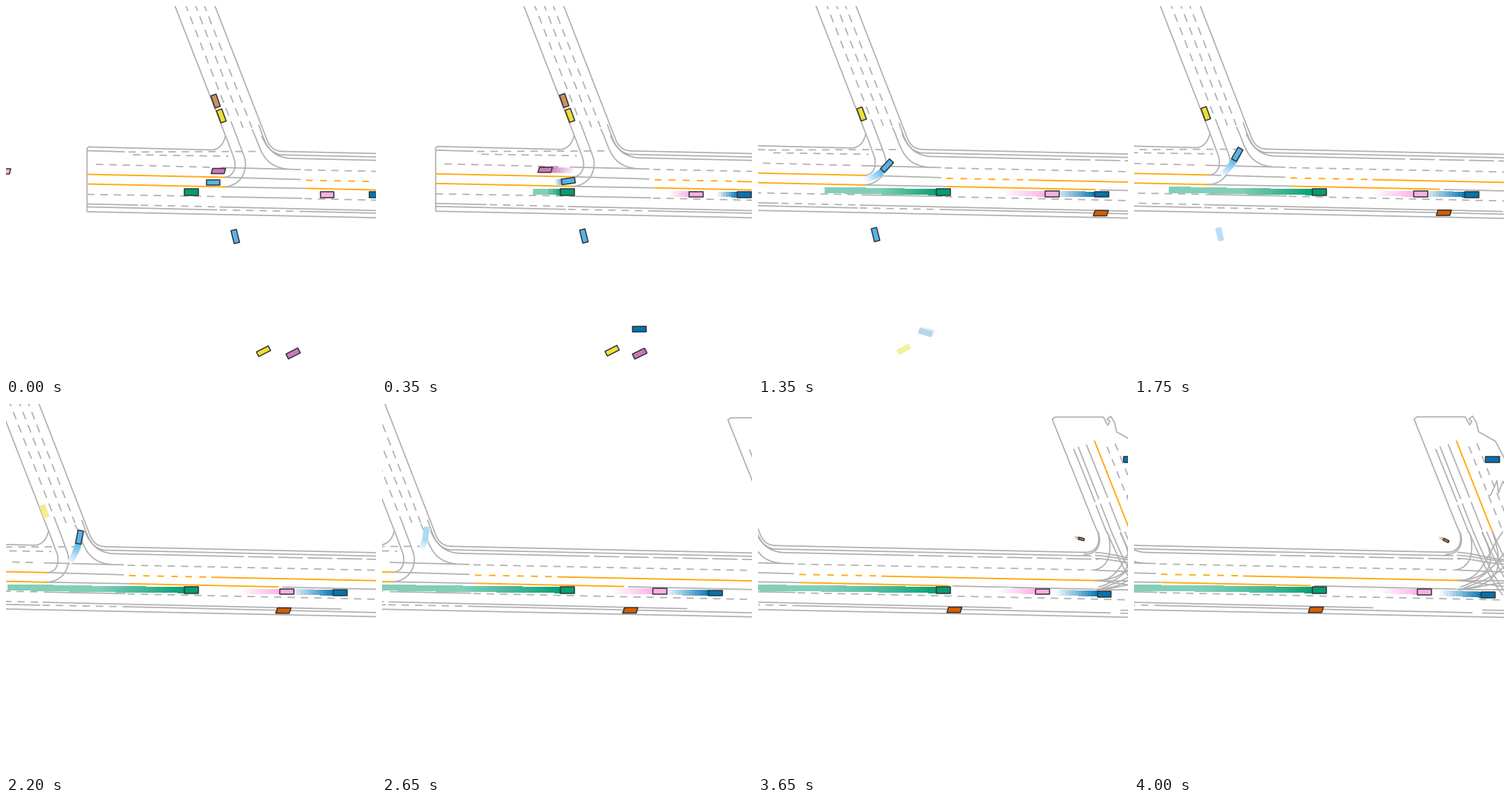
These frames come from a looping animation (500x500 px, 4050 ms). A matplotlib script:

```python
import numpy as np
import matplotlib.pyplot as plt
from matplotlib.animation import FuncAnimation
from matplotlib.collections import LineCollection, PolyCollection
from matplotlib.colors import to_rgb

SIZE, DPI, FRAMES, STEP = 500, 100, 81, 50
PX = 72 / DPI
FADE = 14

BLUE, GREEN, RED, PURPLE = "#0173b2", "#029e73", "#d55e00", "#cc78bc"
BROWN, PINK, YELLOW, SKY = "#ca9161", "#fbafe4", "#ece133", "#56b4e9"
GRAY, AMBER, EDGE = "#b0b0b0", "#ffaa14", "#333333"

# Camera keys: frame, x, y of the view's top-left corner
CAMERA = [(0, 0, 0), (7, 37, 0.7), (19, 106, 2), (35, 194, 3.1),
          (53, 280, 4.2), (65, 326, 4.9), (80, 369, 5.4)]


def spline(t, keys):
    """Smooth interpolation through rows of (frame, values...)."""
    k = np.array(keys, float)
    f, v = k[:, 0], k[:, 1:]
    if len(k) == 1:
        return v[0]
    m = np.gradient(v, f, axis=0)
    i = int(np.clip(np.searchsorted(f, t) - 1, 0, len(f) - 2))
    h = f[i + 1] - f[i]
    u = np.clip((t - f[i]) / h, 0, 1)
    return ((1 + 2 * u) * (1 - u) ** 2 * v[i] + u * (1 - u) ** 2 * h * m[i]
            + u * u * (3 - 2 * u) * v[i + 1] + u * u * (u - 1) * h * m[i + 1])


# ---------------------------------------------------------------- road map
gray, amber = [], []


def line(*pts, to=gray, at=(0, 0)):
    to.append(np.array(pts, float) + at)


def dash(p, q, to=gray, on=10, off=8, at=(0, 0)):
    p, q = np.array(p, float) + at, np.array(q, float) + at
    length = np.hypot(*(q - p))
    for s in np.arange(0, length, on + off):
        e = min(s + on, length)
        to.append(np.array([p + (q - p) * s / length, p + (q - p) * e / length]))


def curve(p, a, b, q, at=(0, 0)):
    u = np.linspace(0, 1, 16)[:, None]
    p, a, b, q = (np.array(c, float) for c in (p, a, b, q))
    gray.append((1 - u) ** 3 * p + 3 * u * (1 - u) ** 2 * a
                + 3 * u * u * (1 - u) * b + u ** 3 * q + at)


def build_west():
    line((278, 194), (111, 190), (109, 192), (109, 277.5))
    curve((278, 194), (289, 193), (294, 184), (296, 175))
    line((109, 195), (160, 196.5))
    dash((165, 196.8), (345, 196))
    dash((171, 200.5), (300, 202.5))
    dash((121, 213.5), (278, 217.5))
    line((109, 227), (296, 231), to=amber)
    line((109, 240), (296, 244), to=amber)
    dash((109, 254), (285, 257))


def build_middle():
    line((290, 217.8), (398, 220.5))
    dash((403, 221), (800, 229))
    line((296, 231), (398, 234))
    dash((405, 235), (512, 237), to=amber, on=9, off=10)
    line((516, 237.3), (807, 243.3), to=amber)
    line((296, 244), (405, 246))
    line((405, 246), (607, 250.3), to=amber)
    line((612, 250.6), (804, 255))
    line((290, 257.3), (400, 259.4))
    dash((403, 259.8), (880, 270))

    line((372, 196), (794, 205.3))
    line((368, 200.6), (800, 210))
    line((382, 205.4), (560, 209.4))
    dash((566, 209.5), (810, 214.5), on=34, off=6)

    line((109, 267), (178, 268.6))
    dash((182, 268.7), (285, 271))
    line((288, 271.1), (692, 280.3))
    line((109, 271), (285, 275))
    dash((288, 275), (396, 277))
    line((396, 277), (826, 287))
    line((109, 277.5), (890, 293.7))


def build_ramp():
    slope = 0.389
    line((226.5, -4), (299, 182), (306, 201))
    curve((306, 201), (313, 217), (307, 231), (294, 231))
    for x in (243, 256, 268):
        dash((x - 4 * slope, -4), (x + 164 * slope, 164), on=11, off=8)
    line((243 + 164 * slope, 164), (321, 202))
    curve((321, 202), (328, 220), (318, 244), (292, 244))
    line((280.5, -4), (352, 180))
    curve((352, 180), (356, 190), (362, 196), (374, 196))
    curve((341, 160), (350, 185), (354, 202), (382, 205.4))
    curve((345, 175), (352, 191), (358, 197), (370, 200.6))
    curve((332, 166), (344, 190), (344, 216), (380, 220))


def build_east():
    at = (369, 5.3)
    line((440, 174), (434, 160), (378, 20), (382, 17), (447, 17), (453, 28),
         (456, 23), (452, 20), (457, 16), (462, 24), (465, 37), (488, 50),
         (500, 73), (512, 100), at=at)
    curve((440, 174), (443, 188), (438, 200), (422, 200), at=at)
    line((407, 60), (436, 132), at=at)
    line((413, 57), (441, 128), at=at)
    line((424, 54), (453, 126), at=at)
    for x, y in ((437, 136), (443, 134), (455, 132)):
        line((x, y), (x + 15, y + 38), at=at)
    line((435, 49), (484, 173), to=amber, at=at)
    dash((452, 57), (498, 172), at=at)
    dash((463, 53), (508, 165), at=at)
    line((478, 124), (482, 122), (490, 103), (492, 120), (498, 104), (504, 116), at=at)

    # Turning lanes inside the crossing
    curve((440, 172), (446, 190), (438, 203), (420, 203), at=at)
    curve((454, 176), (459, 200), (455, 222), (432, 224), at=at)
    curve((470, 174), (486, 205), (492, 235), (438, 238), at=at)
    curve((484, 173), (498, 215), (500, 245), (438, 250), at=at)
    for x in (452, 458, 470, 476, 484):
        curve((x, 172), (x + 14, 205), (x + 28, 235), (x + 46, 258), at=at)
    for x, y in ((498, 172), (508, 190), (512, 205)):
        curve((x, y), (x - 22, y + 30), (470, 238), (440, 238 + (x - 498) * 0.9), at=at)
    for y0, y1 in ((200, 210), (204, 212), (208, 216), (224, 226), (238, 238),
                   (238, 246), (250, 250), (250, 240)):
        curve((436, y0), (460, y0 + 1), (480, y1), (515, y1 + 1), at=at)
    line((470, 278), (515, 279), at=at)
    line((470, 282), (515, 283), at=at)


build_west()
build_middle()
build_ramp()
build_east()


# ---------------------------------------------------------------- agents
class Agent:
    """Box with a fading trail; keys are (frame, x, y, degrees)."""

    def __init__(self, color, keys, born=0, died=FRAMES, size=(18.5, 7.5),
                 skew=0, ego=False):
        self.rgb = np.array(to_rgb(color))
        self.keys, self.born, self.died = keys, born, died
        self.ego = ego
        w, h = size[0] / 2, size[1] / 2
        self.box = np.array([(-w - skew, h), (-w + skew, -h),
                             (w + skew, -h), (w - skew, h)])
        self.shapes = {n: self.shape(n) for n in range(born, min(died + 1, FRAMES))}

    def shape(self, n):
        x, y, deg = spline(n, self.keys)
        c, s = np.cos(np.radians(deg)), np.sin(np.radians(deg))
        return self.box @ np.array([(c, s), (-s, c)]) + (x, y)

    def trail(self, n):
        span = n - self.born + 1
        for k, shape in self.shapes.items():
            if k >= n:
                break
            if self.ego:
                a = max(0.5, 1 - (n - k) / span)
            else:
                a = 1 - (n - k) / min(FADE, span)
            if a > 0.05:
                yield shape, 1 - a * (1 - self.rgb)


agents = [
    Agent(PINK, [(0, -3, 223, 0)], died=4, size=(16, 7), skew=1),
    Agent(PURPLE, [(0, 286.5, 222.5, 0), (7, 257, 221.5, 0), (9, 249, 221.2, 0)],
          died=9, size=(17.5, 7), skew=1),
    Agent(BROWN, [(0, 282.7, 128, 71)], died=11, size=(17.5, 7.5)),
    Agent(YELLOW, [(0, 290.5, 148, 70)], died=38, size=(17.5, 7.5)),
    Agent(SKY, [(0, 309.3, 311, 76)], died=27, size=(18, 7.5)),
    Agent(YELLOW, [(0, 347.5, 466, -27)], died=20, size=(18, 7)),
    Agent(PURPLE, [(0, 387.5, 469, -27), (7, 384.5, 470, -26), (10, 383, 469.5, -25)],
          died=10, size=(18, 7.5)),
    Agent(BLUE, [(4, 384.5, 437, 0), (8, 384, 437, 0), (17, 376.5, 443.5, 17)],
          born=4, died=17, size=(18.5, 7.5)),
    Agent(SKY, [(0, 279, 237.8, 0), (7, 288.3, 236.7, -8), (19, 313, 229, -34),
                (35, 333, 203, -60), (46, 339, 178.5, -83)], died=46, size=(18, 7.5)),
    Agent(PINK, [(0, 433.7, 254.3, 0), (7, 461, 254.5, 0), (19, 514, 255.5, 0),
                 (35, 581, 256.6, 0), (53, 655, 256.7, 0), (65, 703, 257.2, 0),
                 (80, 761, 259, 0)]),
    Agent(BLUE, [(0, 499.5, 254.5, 0), (7, 526, 255.2, 0), (19, 580, 256.2, 0),
                 (35, 650, 257.5, 0), (53, 730, 259.3, 0), (65, 783, 260.2, 0),
                 (80, 847, 263, 0)]),
    Agent(RED, [(24, 614.5, 282, 0), (35, 612.2, 282, 0), (46, 614, 282.4, 0),
                (53, 615.2, 282.6, 0), (80, 614.3, 283, 0)],
          born=24, size=(18, 7.3), skew=1.2),
    Agent(BROWN, [(60, 779.5, 184.8, 4), (65, 782, 185.2, 4), (80, 790.3, 189.4, 25)],
          born=60, size=(7.5, 2.8)),
    Agent(BLUE, [(68, 853, 79.7, 0)], born=68),
    Agent(GREEN, [(n, x + 250.3, y + 251, 0) for n, x, y in CAMERA],
          size=(19, 8.3), ego=True),
]

# ---------------------------------------------------------------- drawing
fig = plt.figure(figsize=(SIZE / DPI, SIZE / DPI), dpi=DPI, facecolor="white")
ax = fig.add_axes([0, 0, 1, 1])
ax.axis("off")

ax.add_collection(LineCollection(gray, colors=GRAY, linewidths=1.7 * PX,
                                 capstyle="butt", zorder=1), autolim=False)
ax.add_collection(LineCollection(amber, colors=AMBER, linewidths=1.9 * PX,
                                 capstyle="butt", zorder=1.5), autolim=False)
trails = PolyCollection([], linewidths=0, zorder=2)
bodies = PolyCollection([], edgecolors=EDGE, linewidths=1.5 * PX, zorder=3)
ax.add_collection(trails, autolim=False)
ax.add_collection(bodies, autolim=False)


def draw(n):
    x, y = spline(n, CAMERA) - 0.5
    ax.set_xlim(x, x + SIZE)
    ax.set_ylim(y + SIZE, y)

    stamps = [s for a in agents for s in a.trail(n)]
    trails.set_verts([s for s, _ in stamps])
    trails.set_facecolor([c for _, c in stamps] or "none")

    alive = [a for a in agents if n in a.shapes]
    bodies.set_verts([a.shapes[n] for a in alive])
    bodies.set_facecolor([a.rgb for a in alive])
    return trails, bodies


anim = FuncAnimation(fig, draw, frames=FRAMES, interval=STEP, repeat=True, blit=False)
plt.show()
```
